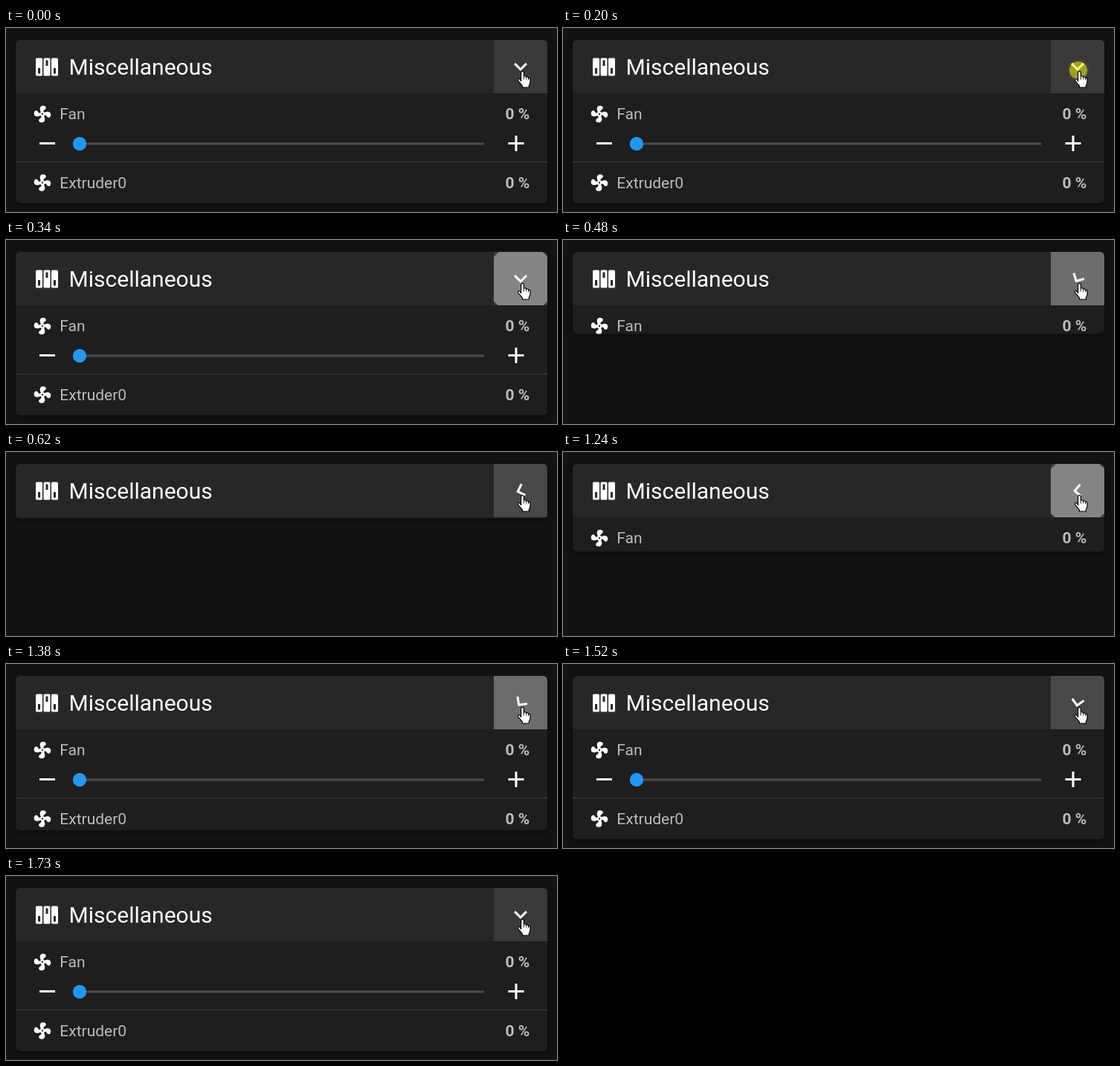
These frames come from a looping animation (741 px wide and 248 px high, 2.19 s). An HTML page with a canvas:

```html
<!DOCTYPE html>
<html lang="en">
<head>
<meta charset="utf-8">
<title>Miscellaneous panel</title>
<style>
html, body { margin: 0; width: 100%; height: 100%; overflow: hidden; background: #121212; }
canvas { display: block; }
</style>
</head>
<body>
<canvas id="stage" width="741" height="248"></canvas>
<script>
const ctx = document.getElementById('stage').getContext('2d');
const LOOP = 2190, STEP = 70;
const CARD = { x: 13, y: 16, w: 715, head: 72, body: 148 };
const FONT = 'Roboto, sans-serif';
const SOFT = '#bcbcbc';

const clamp = v => Math.min(1, Math.max(0, v));
const smooth = v => v * v * (3 - 2 * v);

function bezier(x1, y1, x2, y2) {
  const at = (a, b, s) => 3 * (1 - s) * (1 - s) * s * a + 3 * (1 - s) * s * s * b + s * s * s;
  return p => {
    if (p <= 0) return 0;
    if (p >= 1) return 1;
    let lo = 0, hi = 1;
    for (let i = 0; i < 24; i++) {
      const mid = (lo + hi) / 2;
      if (at(x1, x2, mid) < p) lo = mid; else hi = mid;
    }
    return at(y1, y2, lo);
  };
}
const ease = bezier(0.25, 0.1, 0.25, 1);
const swing = bezier(0.25, 0.8, 0.5, 1);
const decel = bezier(0, 0, 0.2, 1);

const CLICKS = [
  { down: 200, up: 340, run: 375 },
  { down: 1100, up: 1170, run: 1207 }
];

const chevron = new Path2D('M7.41 8.58L12 13.17 16.59 8.58 18 10 12 16 6 10Z');
const blade = new Path2D('M12.5 2C17 2 17.11 5.57 14.75 6.75C13.76 7.24 13.32 8.29 13.13 9.22L12 12L10.14 9.65C8.15 5.96 8.94 2 12.5 2Z');
const hand = new Path2D('M692.6 71.5V60.2Q692.6 58.3 694.5 58.3Q696.4 58.3 696.4 60.2V65Q699.2 64.2 699.6 66Q702.2 65.3 702.5 67.2Q705 66.8 705 69.2V73Q705 75 703.4 77V80H694.4V77.8L689 71.4Q687.8 69.2 689.4 68.5Q690.8 68.1 692.6 71.5Z');
const knuckles = new Path2D('M696.4 65V69.5M699.6 66V69.5M702.5 67.2V70');

// The picture advances in steps and rests after each toggle.
function held(t) {
  const snap = from => from + STEP * Math.floor((t - from) / STEP);
  if (t < 200) return 0;
  if (t < 1100) return Math.min(900, snap(200));
  return Math.min(1730, snap(1100));
}

function rect(x, y, w, h, color) {
  ctx.fillStyle = color;
  ctx.fillRect(x, y, w, h);
}

function disc(x, y, r, color) {
  ctx.fillStyle = color;
  ctx.beginPath();
  ctx.arc(x, y, r, 0, Math.PI * 2);
  ctx.fill();
}

function box(x, y, w, h, r) {
  ctx.beginPath();
  ctx.roundRect(x, y, w, h, r);
}

function text(str, x, y, size, color, weight = 400, align = 'left') {
  ctx.font = `${weight} ${size}px ${FONT}`;
  ctx.textAlign = align;
  ctx.fillStyle = color;
  ctx.fillText(str, x, y);
}

function icon(x, y, scale, turn, draw) {
  ctx.save();
  ctx.translate(x, y);
  ctx.rotate(turn);
  ctx.scale(scale, scale);
  ctx.translate(-12, -12);
  draw();
  ctx.restore();
}

function fan(x, y) {
  for (let i = 0; i < 4; i++) {
    icon(x, y, 1.125, i * Math.PI / 2, () => {
      ctx.fillStyle = '#fff';
      ctx.fill(blade);
    });
  }
  disc(x, y, 3.3, '#fff');
  disc(x, y, 1.15, '#1e1e1e');
}

function switches() {
  icon(55, 52.5, 1.5, 0, () => {
    for (let i = 0; i < 3; i++) {
      const x = 2 + i * 7;
      ctx.fillStyle = '#fff';
      box(x, 4, 6, 16, 1);
      ctx.fill();
      rect(x + 2, i === 1 ? 6 : 13, 2, 5, '#272727');
    }
  });
}

function row(label, y) {
  fan(49, y);
  text(label, 72.3, y + 7, 21, SOFT);
  text('0 %', 704.3, y + 7, 21, SOFT, 700, 'right');
}

function body() {
  row('Fan', 116);
  rect(45, 154, 21, 3, '#fff');
  rect(99, 154.5, 544, 3, '#4c4c4c');
  disc(99, 156, 9.2, '#2196f3');
  rect(675.5, 154, 21, 3, '#fff');
  rect(684.5, 145, 3, 21, '#fff');
  rect(13, 180, 715, 1, '#393939');
  row('Extruder0', 208.5);
}

function ripple(age) {
  if (age < 0 || age > 560) return;
  const grow = decel(age / 250);
  const alpha = 0.38 * clamp(0.1 + age / 90) * (1 - smooth(clamp((age - 120) / 420)));
  disc(693 - grow, 57 - 5 * grow, 15.3 + 35.7 * grow, `rgba(255,255,255,${alpha})`);
}

function toggle(t, open) {
  ctx.save();
  ctx.beginPath();
  ctx.rect(656, 16, 72, 72);
  ctx.clip();
  rect(656, 16, 72, 72, '#393939');
  CLICKS.forEach(c => ripple(t - c.down));
  ctx.restore();
  icon(692, 52, 1.5, (1 - open) * Math.PI / 2, () => {
    ctx.fillStyle = '#fff';
    ctx.fill(chevron);
  });
}

function cursor() {
  ctx.fillStyle = '#fff';
  ctx.fill(hand);
  ctx.strokeStyle = '#000';
  ctx.lineWidth = 1.2;
  ctx.lineJoin = 'round';
  ctx.stroke(hand);
  ctx.lineWidth = 0.9;
  ctx.stroke(knuckles);
}

function draw(t) {
  const [shut, reopen] = CLICKS;
  const state = (fn, ms) => 1 - fn((t - shut.run) / ms) + fn((t - reopen.run) / ms);
  const height = CARD.head + CARD.body * state(swing, 300);

  rect(0, 0, 741, 248, '#121212');
  ctx.save();
  ctx.shadowColor = 'rgba(0,0,0,0.4)';
  ctx.shadowBlur = 6;
  ctx.shadowOffsetY = 2;
  ctx.fillStyle = '#1e1e1e';
  box(CARD.x, CARD.y, CARD.w, height, 6);
  ctx.fill();
  ctx.restore();

  ctx.save();
  box(CARD.x, CARD.y, CARD.w, height, 6);
  ctx.clip();
  body();
  rect(CARD.x, CARD.y, CARD.w, CARD.head, '#272727');
  switches();
  text('Miscellaneous', 84.6, 63, 30, '#fff');
  toggle(t, state(ease, 500));
  ctx.restore();

  if (CLICKS.some(c => t >= c.down && t < c.up)) disc(693, 57, 12, 'rgba(255,255,0,0.5)');
  cursor();
}

const start = performance.now();
function tick() {
  draw(held((performance.now() - start) % LOOP));
  requestAnimationFrame(tick);
}
tick();
</script>
</body>
</html>
```
